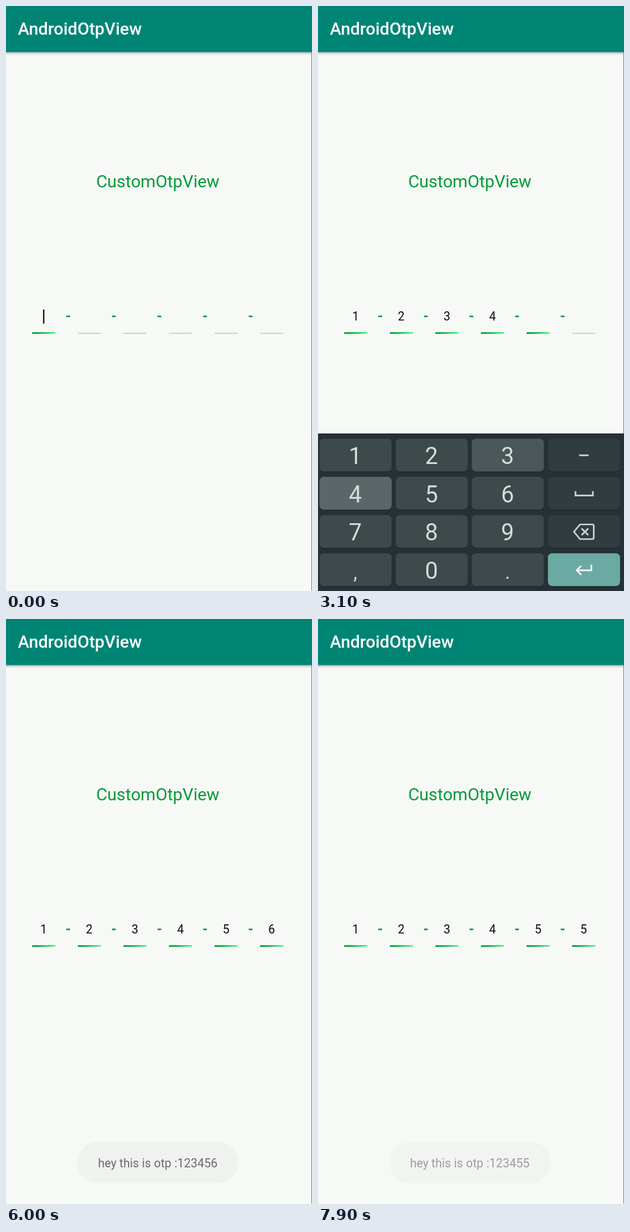
Animation of 502 by 958 pixels, one loop 8000 ms. Source, as an HTML page:

```html
<!DOCTYPE html>
<html lang="en">
<head>
<meta charset="utf-8">
<title>OTP entry</title>
<style>
html, body { margin: 0; width: 100%; height: 100%; overflow: hidden; background: #f7f9f7; }
svg { display: block; width: 502px; height: 958px; font-family: Roboto, sans-serif; }
</style>
</head>
<body>
<svg id="stage" viewBox="0 0 502 958">
  <defs>
    <linearGradient id="active" x1="0" y1="0" x2="1" y2="0">
      <stop offset="0" stop-color="#009a34"/>
      <stop offset=".4" stop-color="#0cb547"/>
      <stop offset="1" stop-color="#45ff86"/>
    </linearGradient>
    <linearGradient id="shade" x1="0" y1="0" x2="0" y2="1">
      <stop offset="0" stop-color="#000" stop-opacity=".3"/>
      <stop offset=".5" stop-color="#000" stop-opacity=".1"/>
      <stop offset="1" stop-color="#000" stop-opacity="0"/>
    </linearGradient>
  </defs>
  <rect width="502" height="958" fill="#f7f9f7"/>
  <rect y="75" width="502" height="6" fill="url(#shade)"/>
  <rect width="502" height="75.5" fill="#008575"/>
  <text x="19.5" y="47" font-size="28" font-weight="500" fill="#fff">AndroidOtpView</text>
  <text x="249" y="297" font-size="28" fill="#009a35" text-anchor="middle">CustomOtpView</text>
  <rect x="501" y="76" width="1" height="881" fill="#72827f"/>
  <g id="cells"></g>
  <rect id="cursor" x="60.8" y="497" width="2.2" height="23" fill="#111"/>
  <g id="keyboard"></g>
  <g id="toast">
    <rect x="117" y="856" width="264.5" height="68" rx="34" fill="#eceeec"/>
    <text id="message" x="249" y="898" font-size="19.6" fill="#161616" text-anchor="middle"></text>
  </g>
</svg>
<script>
const LOOP = 8000;
const KEYBOARD_TRAVEL = 200;
const $ = id => document.getElementById(id);

function add(parent, tag, attrs, text = '') {
  const node = document.createElementNS('http://www.w3.org/2000/svg', tag);
  for (const name in attrs) node.setAttribute(name, attrs[name]);
  node.textContent = text;
  parent.appendChild(node);
  return node;
}

const presses = [
  [2500, '1'], [2700, '2'], [2850, '3'], [3000, '4'], [3200, '5'], [3620, '6'],
  [7050, 'del'], [7490, '5']
];
const keyboardShows = [
  { enter: 1343, exit: 3780 },
  { enter: 6598, exit: 7675 }
];
const toasts = [
  { enter: 3870, exit: 5850, code: '123456' },
  { enter: 7760, exit: Infinity, code: '123455' }
];
const cursorSpans = [[0, 500], [1000, 1400], [2000, 2400]];

const cells = Array.from({ length: 6 }, (_, i) => {
  const x = 43 + 74.8 * i, group = $('cells');
  if (i) add(group, 'rect', { x: x - 18.8, y: 507, width: 6.2, height: 2.5, fill: '#009a35' });
  return {
    idle: add(group, 'rect', { x, y: 534.9, width: 38, height: 2, fill: '#d0d2d0' }),
    // The slight skew follows the diagonal shading of the line.
    active: add(group, 'path', { d: `M${x} 534.2l38 -.3v2.5l-38 .5z`, fill: 'url(#active)' }),
    digit: add(group, 'text', { x: x + 18.8, y: 515, 'font-size': 19.6, 'text-anchor': 'middle', fill: '#0a0a0a' })
  };
});

const icons = {
  '-': 'M-8 0H7.5',
  space: 'M-14 -4V3.3H14.5V-4',
  del: 'M-6.500 -12H13.500Q16 -12 16 -9.500V9.500Q16 12 13.500 12H-6.500L-16.500 0ZM-4 -5.500L7 5.500M7 -5.500L-4 5.500',
  enter: 'M12 -8.500V.5H-11M-4.500 -7L-12 .5L-4.500 8'
};
const layout = [['1', '2', '3', '-'], ['4', '5', '6', 'space'], ['7', '8', '9', 'del'], [',', '0', '.', 'enter']];
const glow = {};

function buildKey(label, col, row) {
  const board = $('keyboard');
  const x = 2.5 + 124.9 * col, y = 708.5 + 62.6 * row;
  const box = { x, y, width: 118.3, height: 53.7, rx: 7 };
  const fill = label === 'enter' ? '#6baaa3' : col === 3 ? '#303c40' : '#3e494c';
  add(board, 'rect', { ...box, y: y + 1.3, fill: '#1a2528' });
  add(board, 'rect', { ...box, fill });
  glow[label] = add(board, 'rect', { ...box, fill: '#5a6667', opacity: 0 });
  if (icons[label]) {
    add(board, 'path', {
      d: icons[label], transform: `translate(${x + 59.2} ${y + 27.3})`, fill: 'none',
      stroke: label === 'enter' ? '#f2f8f7' : '#ccd1d1', 'stroke-width': 2.7
    });
  } else {
    add(board, 'text', {
      x: x + 58.7, y: y + 41.5, 'font-size': /\d/.test(label) ? 38 : 32,
      'text-anchor': 'middle', fill: '#d7dbdb'
    }, label);
  }
}

add($('keyboard'), 'rect', { y: 700, width: 502, height: 260, fill: '#253134' });
layout.forEach((keys, row) => keys.forEach((label, col) => buildKey(label, col, row)));

const clamp = v => Math.max(0, Math.min(1, v));
const progress = (t, start, duration) => clamp((t - start) / duration);

function typedAt(t) {
  return presses.filter(([at]) => at <= t)
    .reduce((code, [, key]) => key === 'del' ? code.slice(0, -1) : code + key, '');
}

// Share of the keyboard's travel still hidden: 0 is fully open, 1 is closed.
function keyboardHidden(t) {
  const show = keyboardShows.find(s => t >= s.enter && t < s.exit + 200);
  if (!show) return 1;
  return t < show.exit
    ? (1 - progress(t, show.enter, 300)) ** 5
    : progress(t, show.exit, 200) ** 2;
}

function render(t) {
  const code = typedAt(t);
  cells.forEach((cell, i) => {
    const lit = i <= code.length;
    cell.active.setAttribute('opacity', lit ? 1 : 0);
    cell.idle.setAttribute('opacity', lit ? 0 : 1);
    cell.digit.textContent = code[i] || '';
  });

  const cursorOn = cursorSpans.some(([from, to]) => t >= from && t < to);
  $('cursor').setAttribute('opacity', cursorOn ? 1 : 0);

  const hidden = keyboardHidden(t);
  $('keyboard').setAttribute('transform', `translate(0 ${hidden * KEYBOARD_TRAVEL})`);
  $('keyboard').setAttribute('opacity', 1 - hidden ** 0.85);

  for (const key in glow) {
    const level = presses.reduce((best, [at, name]) =>
      name === key && t >= at ? Math.max(best, 1 - progress(t, at + 200, 100)) : best, 0);
    glow[key].setAttribute('opacity', level);
  }

  const toast = toasts.findLast(item => t >= item.enter);
  const shown = toast ? progress(t, toast.enter, 350) * (1 - progress(t, toast.exit, 400)) : 0;
  $('toast').setAttribute('opacity', shown);
  $('message').textContent = toast ? `hey this is otp :${toast.code}` : '';
}

const start = performance.now();
function tick() {
  render((performance.now() - start) % LOOP);
  requestAnimationFrame(tick);
}
tick();
</script>
</body>
</html>
```
